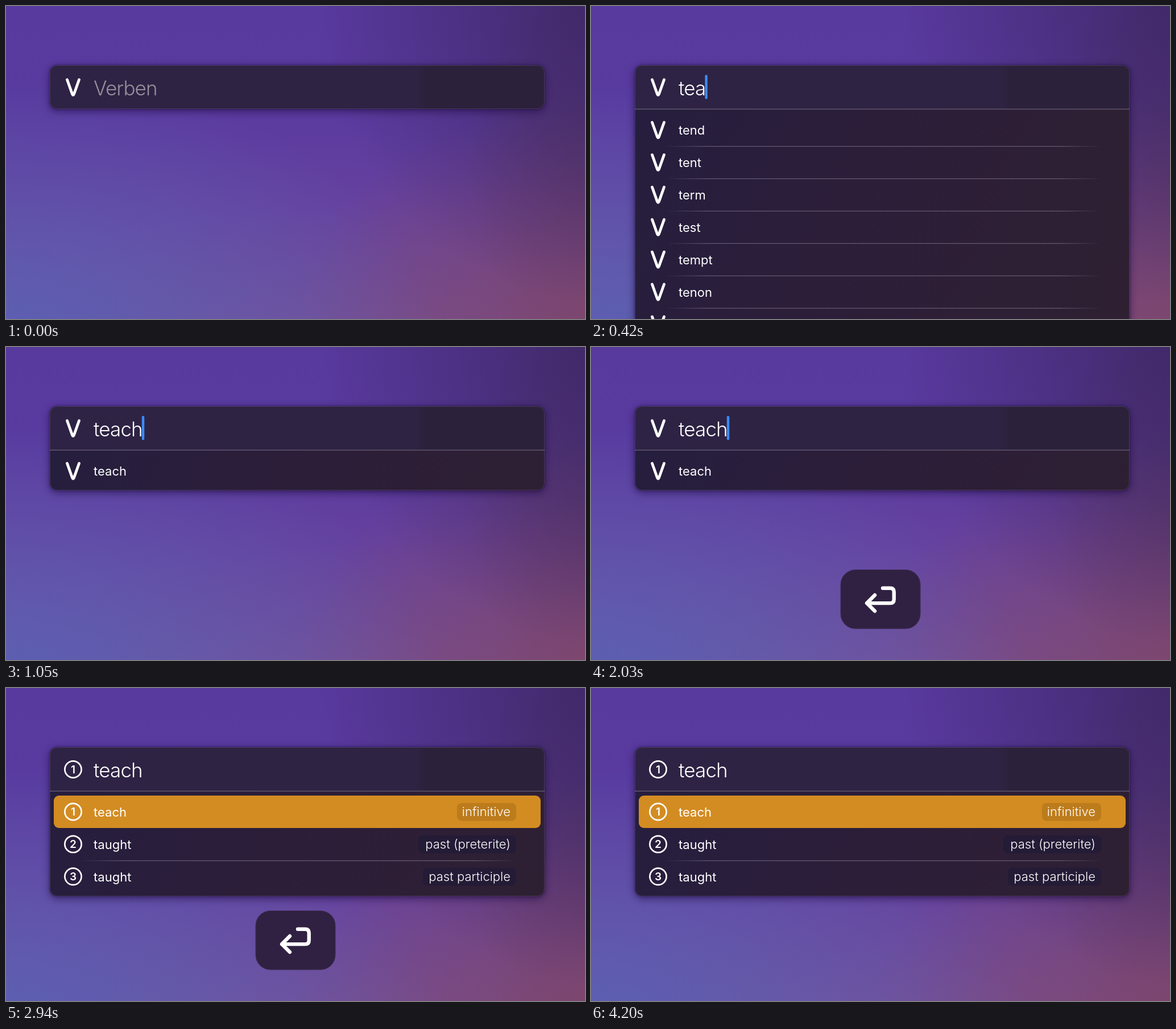
An HTML page for the animation above (4270 ms loop, 1018x550 px).

```html
<!DOCTYPE html>
<html lang="en">
<head>
<meta charset="utf-8">
<title>Verb search</title>
<style>
  html, body { margin: 0; width: 100%; height: 100%; overflow: hidden; }
  body {
    background:
      radial-gradient(75% 85% at 0 108%, #5a60b4, #5a60b400),
      radial-gradient(50% 95% at 104% 0, #3f2867, #3f286700),
      radial-gradient(55% 75% at 104% 104%, #7e466c, #7e466c00),
      radial-gradient(24% 70% at 104% 50%, #593767, #59376700),
      linear-gradient(#58399e, #593a9f 30%, #65419f 62%, #754e97);
  }
  svg { display: block; width: 1018px; height: 550px; }
  text { font: 400 22px Inter, Roboto, sans-serif; fill: #fff; }
  .query { font-size: 35px; font-weight: 300; letter-spacing: -.025em; }
  .hint { fill: #978f9b; }
  .tag { font-weight: 300; text-anchor: end; }
  .digit { font-size: 19px; font-weight: 600; text-anchor: middle; }
  .line { fill: none; stroke: #fff; stroke-linecap: round; stroke-linejoin: round; }
  .shadow { filter: drop-shadow(0 4px 7px #1a063a66) drop-shadow(0 0 2px #1a063a88); }
</style>
</head>
<body>
<svg viewBox="0 0 1018 550">
  <defs>
    <linearGradient id="head">
      <stop stop-color="#2e2344"/><stop offset=".74" stop-color="#2e2342"/>
      <stop offset=".76" stop-color="#2c213b"/><stop offset="1" stop-color="#2c213a"/>
    </linearGradient>
    <linearGradient id="body" gradientUnits="userSpaceOnUse" x1="77" y1="200" x2="900" y2="560">
      <stop stop-color="#261e3e"/><stop offset=".55" stop-color="#2d1e38"/><stop offset="1" stop-color="#2e2032"/>
    </linearGradient>
    <linearGradient id="rule">
      <stop stop-color="#665b72" stop-opacity="0"/><stop offset=".1" stop-color="#665b72"/>
      <stop offset=".9" stop-color="#665b72"/><stop offset="1" stop-color="#665b72" stop-opacity="0"/>
    </linearGradient>
  </defs>
  <g id="scene"></g>
</svg>
<script>
const LOOP = 4270, STEP = 70, ROW = 56.9;
const scene = document.getElementById('scene');
const typing = [[70, 't'], [210, 'te'], [420, 'tea'], [560, 'teac'], [770, 'teach']];
const results = [
  [420, 'tend tent term test tempt tenon tense tenure tether'],
  [630, 'team tear teach tease teasel'],
  [1050, 'teach'],
];
const forms = [['teach', 'infinitive', 104], ['taught', 'past (preterite)', 172], ['taught', 'past participle', 164]];

const latest = (list, t) => list.filter(([start]) => t >= start).pop()?.[1] ?? '';
const clamp = x => Math.max(0, Math.min(1, x));
const mix = (a, b, k) => a + (b - a) * k;
const rowY = i => 218 + i * ROW;
const fade = (k, content) => k > 0 ? `<g opacity="${k}">${content}</g>` : '';
const label = (x, y, text, cls = '') => `<text x="${x}" y="${y}" class="${cls}">${text}</text>`;
const rect = (x, y, w, h, r, fill, extra = '') =>
  `<rect x="${x}" y="${y}" width="${w}" height="${h}" rx="${r}" fill="${fill}" ${extra}/>`;

const letterIcon = y =>
  `<path class="line" stroke-width="4.8" d="M107.5 ${y - 13.5}l9 25.3q1.5 3.4 3 0l9-25.3"/>`;
const digitIcon = (y, n) =>
  `<circle class="line" stroke-width="2.7" cx="118" cy="${y}" r="14.6"/>` + label(118, y + 6.9, n, 'digit');
const divider = i => rect(130, rowY(i) + 28, 768, 1.2, 0, 'url(#rule)');

const wordList = words => words.map((word, i) =>
  letterIcon(rowY(i)) + label(154, rowY(i) + 8, word) + (i < words.length - 1 ? divider(i) : '')).join('');

const formList = () =>
  rect(84, 189, 856, 57, 9, '#d38c22') + divider(1) +
  forms.map(([word, kind, w], i) =>
    digitIcon(rowY(i) - .5, i + 1) + label(154, rowY(i) + 8, word) +
    rect(897 - w, rowY(i) - 16, w, 31.5, 8, i ? '#241b36' : '#bd7c1c') +
    label(887, rowY(i) + 7.3, kind, 'tag')).join('');

const returnKey = () =>
  rect(439, 391.5, 140, 103.5, 26, '#302142', 'stroke="#3f2c55"') +
  '<path class="line" stroke-width="6.4" d="M513 423.7h13q6.7 0 6.7 6.7v13q0 6.7-6.7 6.7h-41M499 436l-14 14.1 14 14"/>';

function draw(t) {
  const query = latest(typing, t);
  const words = latest(results, t).split(' ').filter(Boolean);
  const open = clamp((t - 2170 + STEP) / 350);      // word list turns into its forms
  const key = clamp((t - 1960 + STEP) / 140) * clamp((3220 - t) / 280);
  const caret = query && !(t >= 1470 && t < 1960) ? 1 - open : 0;
  const rows = mix(words.length, forms.length, open);
  const height = words.length ? 91 + 57 * rows : 77;

  scene.innerHTML =
    rect(77, 104, 870, height, 13, 'url(#body)', 'class="shadow"') +
    `<clipPath id="panel">${rect(77, 104, 870, height, 13, '#000')}</clipPath>` +
    '<g clip-path="url(#panel)">' +
      rect(77, 104, 870, 77, 0, 'url(#head)') +
      (words.length ? rect(77, 180.6, 870, 1.3, 0, '#675c73') : '') +
      fade(1 - open, letterIcon(143) + wordList(words)) +
      fade(open, digitIcon(143, 1) + formList()) +
    '</g>' +
    rect(77.5, 104.5, 869, height - 1, 12.5, 'none', 'stroke="#fff" stroke-opacity=".11"') +
    label(154, 156.8, query || 'Verben', query ? 'query' : 'query hint') +
    fade(key, returnKey());

  if (caret > 0) {
    const end = 153 + scene.querySelector('.query').getComputedTextLength();
    scene.insertAdjacentHTML('beforeend', fade(caret, rect(end, 121, 4.4, 42.5, 2, '#3a8cf7')));
  }
}

let shown = -1;
function tick() {
  const t = Math.floor(performance.now() % LOOP / STEP) * STEP;
  if (t !== shown) draw(shown = t);
  requestAnimationFrame(tick);
}
tick();
</script>
</body>
</html>
```
